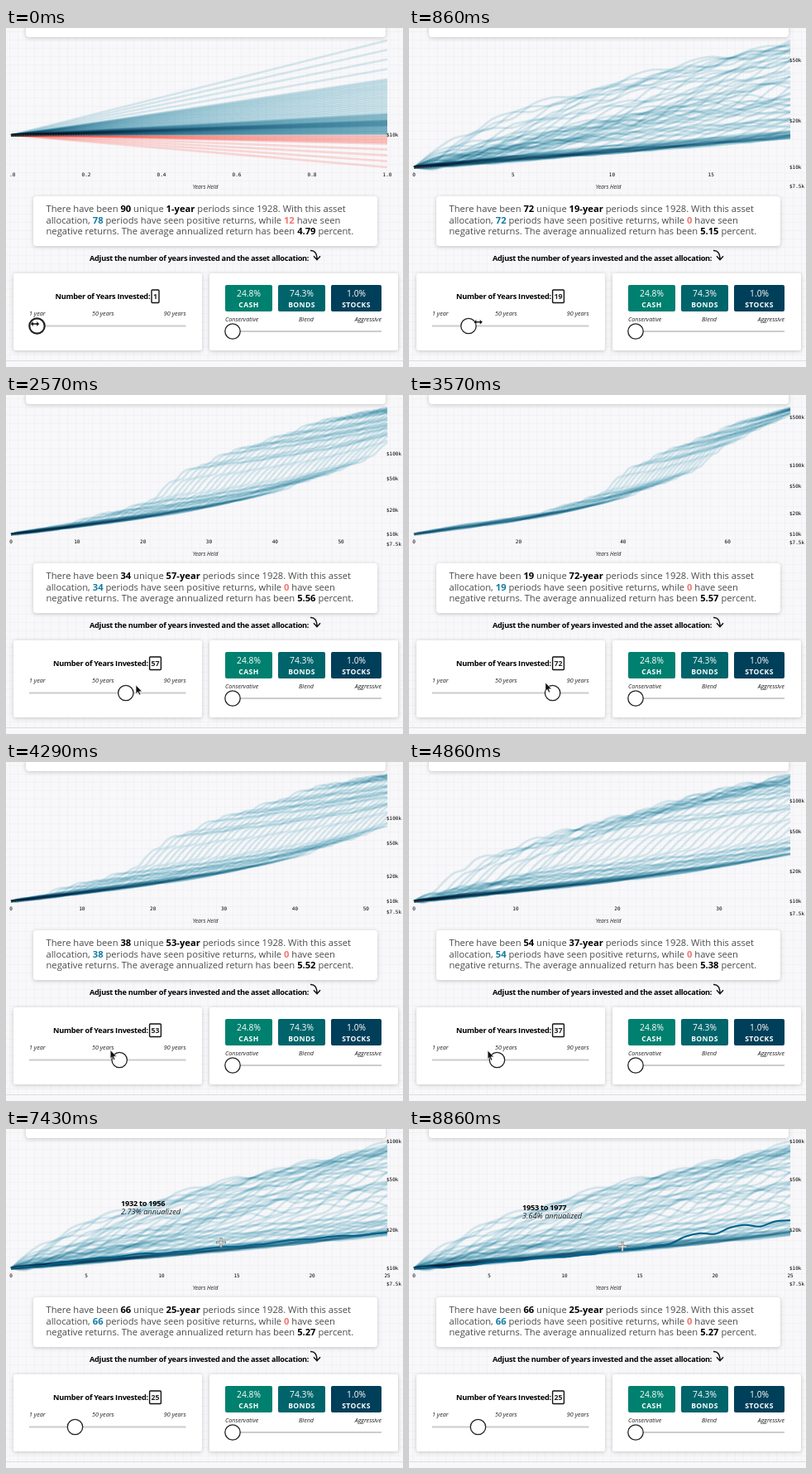
An HTML page with a canvas that plays this animation: 480 px wide and 409 px high, repeating every 9010 ms.

```html
<!DOCTYPE html>
<html lang="en">
<head>
<meta charset="utf-8">
<title>Years invested</title>
<style>
  html, body { margin: 0; width: 100%; height: 100%; overflow: hidden; background: #f8f7f9; }
  canvas, svg { position: absolute; left: 0; top: 0; width: 480px; height: 409px; }
  text { font-family: "Open Sans", "Noto Sans", sans-serif; fill: #222; }
  .panel { fill: #fff; filter: drop-shadow(0 1px 2.5px #0003); }
  .body { font-size: 11.2px; fill: #4a4a4a; }
  .head { font-size: 9.2px; font-weight: 700; letter-spacing: -.27px; fill: #000; }
  .small { font-size: 7.2px; font-style: italic; }
  .axis text { font: 6px "DejaVu Sans Mono", monospace; fill: #000; }
  .mid { text-anchor: middle; }
  .body tspan { font-weight: 700; }
  .dark { fill: #000; } .gain { fill: #127c9f; } .loss { fill: #f4766c; }
  .track { stroke: #ccc; stroke-width: 1.8; }
  .knob { fill: #fff; stroke: #222; stroke-width: 1.3; }
  .pct { font-size: 10.3px; fill: #fff; }
  .asset { font-size: 8.6px; font-weight: 700; letter-spacing: .4px; fill: #fff; }
</style>
</head>
<body>
<canvas width="480" height="409"></canvas>
<svg viewBox="0 0 480 409">
  <defs><clipPath id="edge"><rect x="4" width="476" height="409"/></clipPath></defs>
  <rect class="panel" x="24" y="-10" width="435" height="21" rx="4"/>
  <rect class="panel" x="33" y="203" width="416" height="60" rx="4"/>
  <rect class="panel" x="9" y="296" width="228" height="93" rx="3"/>
  <rect class="panel" x="246" y="296" width="228" height="93" rx="3"/>

  <g class="axis" id="axis" clip-path="url(#edge)"></g>
  <text class="mid" x="241" y="194" font-size="6.7" font-style="italic">Years Held</text>
  <g id="summary"></g>

  <text class="head" x="101" y="280.5">Adjust the number of years invested and the asset allocation:</text>
  <path d="M368 268.500q8-.5 8 11M372 275.200l4 4.400 4-4.400" fill="none" stroke="#111" stroke-width="1.4"/>

  <g id="counter">
    <text class="head" y="327">Number of Years Invested:</text>
    <rect x="116.500" y="316" height="15.500" rx="1" fill="none" stroke="#111" stroke-width="1.4"/>
    <text class="mid" id="years" y="327" font-size="8.8" font-weight="700"></text>
  </g>
  <text class="small" x="28" y="346.500">1 year</text>
  <text class="small" x="104" y="346.500">50 years</text>
  <text class="small" x="217.500" y="346.500" text-anchor="end">90 years</text>
  <path class="track" d="M28 359.500H217.500M265 366H454"/>
  <circle class="knob" id="knob" cy="359.500" r="9.200"/>
  <circle class="knob" cx="274" cy="366" r="9.200"/>

  <g id="assets"></g>
  <text class="small" x="265" y="353.500">Conservative</text>
  <text class="small mid" x="363" y="353.500">Blend</text>
  <text class="small" x="454" y="353.500" text-anchor="end">Aggressive</text>

  <g id="tip">
    <text class="head" id="span" x="-121" y="-43.600"></text>
    <text id="rate" x="-121" y="-34.200" font-size="9.2" font-style="italic"></text>
  </g>
  <path id="resize" d="M-5.500 0L-2-3.200V-1H2V-3.200L5.500 0 2 3.200V1H-2V3.200Z" fill="#111" stroke="#fff" stroke-width=".5"/>
  <path id="arrow" d="M0 0V10.500L2.400 8.300 4 12 5.700 11.200 4.200 7.700H7.500Z" fill="#111" stroke="#fff" stroke-width=".6"/>
  <g id="cross">
    <path d="M-6 0H6M0-6V6" stroke="#777" stroke-width="2.800"/>
    <path d="M-5.200 0H5.200M0-5.200V5.200" stroke="#fff" stroke-width="1.100"/>
  </g>
</svg>
<script>
const LOOP = 9010, FPS = 7, FIRST_YEAR = 1928, YEARS = 90;
const LEFT = 6, RIGHT = 461, TOP = 15, BOTTOM = 168;
const $ = id => document.getElementById(id);
const ctx = document.querySelector('canvas').getContext('2d');

// Key points: position, then values.
const yearTrack = [[0, 1], [140, 1], [1570, 37], [2570, 57], [3250, 74], [3570, 72], [4860, 37], [5700, 16], [6300, 25]];
const cursorTrack = [[0, 35, 357], [1570, 124, 353], [2570, 157, 350], [3250, 183, 349], [3570, 165, 347],
  [4860, 95, 348], [6300, 84, 352], [6860, 262, 126], [7430, 260, 137], [8140, 259, 124], [8860, 258, 142]];
const averageTrack = [[1, 4.79], [25, 5.27], [37, 5.38], [57, 5.56], [72, 5.57]];
// Time, first year and annualized return of the highlighted period.
const hovers = [[6850, 1966, 7.16], [7280, 1932, 2.73], [8000, 1966, 7.16], [8570, 1953, 3.64]];

function sample(track, x) {
  const i = track.findIndex(row => row[0] > x);
  if (i < 0) return track[track.length - 1].slice(1);
  const a = track[i - 1], b = track[i], f = (x - a[0]) / (b[0] - a[0]);
  return a.slice(1).map((v, k) => v + (b[k + 1] - v) * f);
}

// Annual returns: a long trend with scatter decides each year's rank, the rank its return in percent.
const trend = [[0, 3.6], [20, 1.4], [38, 2.6], [46, 6.5], [51, 5], [56, 17], [61, 8.5], [76, 7], [89, 1.5]];
const returnByRank = [[0, -8], [4, -2.3], [12, .1], [30, 2.2], [50, 3.8], [62, 5.6], [75, 11.2], [85, 15.3], [89, 27.3]];
const scores = Array.from({ length: YEARS }, (_, i) =>
  sample(trend, i)[0] + (i < 42 ? 3.3 : 12) * (2 * (i * .618034 % 1) - 1));
const returns = scores.map(score => sample(returnByRank, scores.filter(s => s < score).length)[0] / 100);

// Log growth of an untouched portfolio (1% stocks) for every starting year.
const growth = returns.map((_, start) => {
  let main = .99, stock = .01;
  return [0, ...returns.slice(start).map(r => Math.log((main *= 1 + r) + (stock *= 1.113)))];
});

function tickStep(n) {
  const raw = n / 5, power = 10 ** Math.floor(Math.log10(raw)), r = raw / power;
  return power * (r >= Math.sqrt(50) ? 10 : r >= Math.sqrt(10) ? 5 : r >= Math.SQRT2 ? 2 : 1);
}

function curve(points) {
  const p = i => points[Math.max(0, Math.min(points.length - 1, i))];
  ctx.beginPath();
  ctx.moveTo(...points[0]);
  for (let i = 0; i < points.length - 1; i++) {
    const [a, b, c, d] = [p(i - 1), p(i), p(i + 1), p(i + 2)];
    ctx.bezierCurveTo(b[0] + (c[0] - a[0]) / 6, b[1] + (c[1] - a[1]) / 6,
      c[0] - (d[0] - b[0]) / 6, c[1] - (d[1] - b[1]) / 6, c[0], c[1]);
  }
  ctx.stroke();
}

function drawBackground() {
  ctx.globalCompositeOperation = 'source-over';
  ctx.fillStyle = '#f8f7f9';
  ctx.fillRect(0, 0, 480, 409);
  ctx.fillStyle = '#f2f1f4';
  for (let i = 4; i < 480; i += 10) {
    ctx.fillRect(i, 0, 1, 401);
    if (i < 401) ctx.fillRect(0, i, 480, 1);
  }
  ctx.fillStyle = '#dddce0';
  ctx.fillRect(0, 401, 480, 1);
}

function drawChart(n, hover) {
  const paths = growth.slice(0, YEARS + 1 - n).map(path => path.slice(0, n + 1));
  const ends = paths.map(path => path[n]);
  const low = Math.min(0, ...ends), high = Math.max(...ends);
  const x = year => LEFT + (RIGHT - LEFT) * year / n;
  const y = v => BOTTOM - (BOTTOM - TOP) * (v - low) / (high - low);
  const points = path => path.map((v, i) => [x(i), y(v)]);

  drawBackground();
  ctx.globalCompositeOperation = 'multiply';
  ctx.lineWidth = 2.6;
  for (const path of paths) {
    ctx.strokeStyle = path[n] > 0 ? 'rgba(20,140,175,.16)' : 'rgba(255,115,102,.25)';
    curve(points(path));
  }
  ctx.globalCompositeOperation = 'source-over';
  ctx.strokeStyle = 'rgba(255,240,238,.7)';
  ctx.lineWidth = .8;
  ctx.setLineDash([1, 1]);
  curve([[LEFT, y(0)], [RIGHT, y(0)]]);
  ctx.setLineDash([]);
  if (hover) {
    ctx.strokeStyle = '#00608a';
    ctx.lineWidth = 2;
    curve(points(paths[hover[1] - FIRST_YEAR]));
  }

  let labels = '';
  const step = tickStep(n);
  for (let i = 0; i * step <= n + 1e-6; i++)
    labels += `<text class="mid" x="${x(i * step)}" y="179">${(i * step).toFixed(step < 1 ? 1 : 0)}</text>`;
  for (const k of [7.5, 10, 20, 50, 100, 500]) {
    const at = y(Math.log(k / 10));
    if (at >= TOP && at < 196) labels += `<text x="460" y="${at + 2}">$${k}k</text>`;
  }
  $('axis').innerHTML = labels;

  const gains = ends.filter(v => v > 0).length;
  const bold = (cls, value) => `<tspan class="${cls}">${value}</tspan>`;
  $('summary').innerHTML = [
    `There have been ${bold('dark', ends.length)} unique ${bold('dark', n + '-year')} periods since 1928. With this asset`,
    `allocation, ${bold('gain', gains)} periods have seen positive returns, while ${bold('loss', ends.length - gains)} have seen`,
    `negative returns. The average annualized return has been ${bold('dark', sample(averageTrack, n)[0].toFixed(2))} percent.`
  ].map((line, i) => `<text class="body" x="48.500" y="${222 + 13.5 * i}">${line}</text>`).join('');
}

function drawSlider(n, held) {
  const box = 4.2 + 4.8 * String(n).length;
  $('counter').setAttribute('transform', `translate(${122 - (116 + box) / 2})`);
  $('counter').querySelector('rect').setAttribute('width', box);
  $('years').setAttribute('x', 116.5 + box / 2);
  $('years').textContent = n;
  $('knob').setAttribute('cx', 37.5 + (n - 1) * 1.917);
  $('knob').style.strokeWidth = held ? 2.2 : 1.3;
}

function drawCursor(t, hover) {
  const place = `translate(${sample(cursorTrack, t).join(' ')})`;
  const shown = t < 2000 ? 'resize' : hover ? 'cross' : 'arrow';
  for (const id of ['resize', 'arrow', 'cross', 'tip']) {
    $(id).setAttribute('transform', place);
    $(id).style.display = id === shown || (id === 'tip' && hover) ? '' : 'none';
  }
  if (hover) {
    $('span').textContent = `${hover[1]} to ${hover[1] + 24}`;
    $('rate').textContent = `${hover[2].toFixed(2)}% annualized`;
  }
}

$('assets').innerHTML = [
  [265, 57, '#00806f', '24.8%', 'CASH'],
  [329, 57, '#00646b', '74.3%', 'BONDS'],
  [393, 61, '#003f59', '1.0%', 'STOCKS']
].map(([x, w, color, pct, name]) => `<rect x="${x}" y="310" width="${w}" height="32" rx="2" fill="${color}"/>
  <text class="pct mid" x="${x + w / 2}" y="323.500">${pct}</text>
  <text class="asset mid" x="${x + w / 2}" y="336.500">${name}</text>`).join('');

let last = -1;
function tick() {
  const frame = Math.min(62, Math.floor((performance.now() % LOOP + 5) * FPS / 1000));
  if (frame !== last) {
    last = frame;
    const t = frame * 1000 / FPS;
    const n = Math.round(sample(yearTrack, t)[0]);
    const hover = hovers.filter(h => h[0] <= t).pop();
    drawChart(n, hover);
    drawSlider(n, t < 140);
    drawCursor(t, hover);
  }
  requestAnimationFrame(tick);
}
tick();
</script>
</body>
</html>
```
